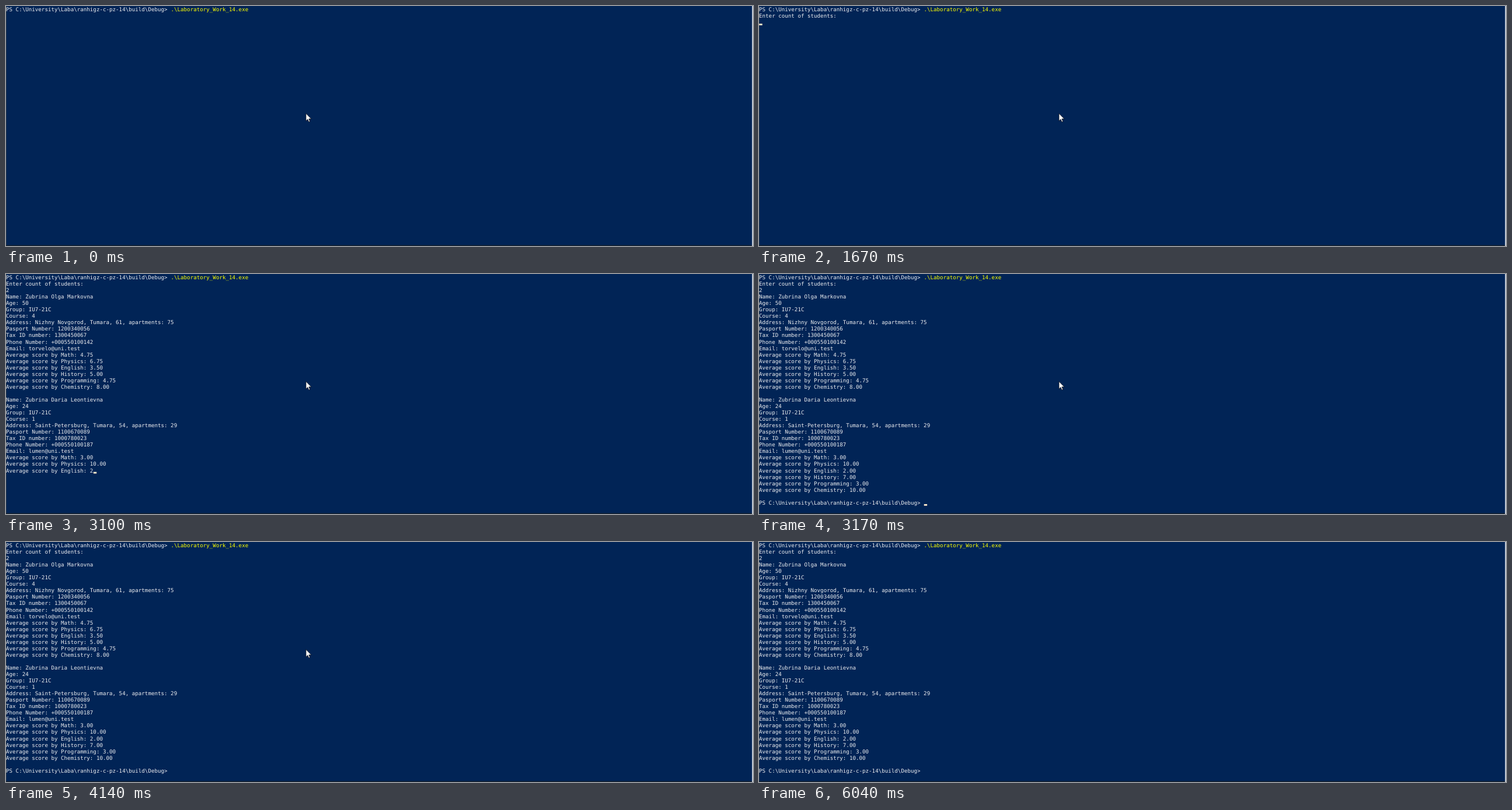
These frames come from a looping animation (1280x412 px, 6380 ms). An HTML page:

```html
<!DOCTYPE html>
<html lang="en">
<head>
<meta charset="utf-8">
<title>Terminal session</title>
<style>
  html, body { margin: 0; width: 100%; height: 100%; overflow: hidden; background: #012456; }
  svg { display: block; width: 1280px; height: 412px; }
  text {
    font: 9.2px "DejaVu Sans Mono", monospace;
    text-rendering: geometricPrecision;
    white-space: pre;
    fill: #eeedf0;
  }
  .cmd { fill: #ffff00; }
</style>
</head>
<body>
<svg viewBox="0 0 1280 412">
  <rect width="1280" height="412" fill="#012456"/>
  <rect width="1" height="411" fill="#24364c"/>
  <rect y="410.5" width="1280" height="1.5" fill="#17222f"/>
  <rect x="1278.5" width="1.5" height="412" fill="#e9ecef"/>
  <g id="rows"></g>
  <rect id="caret" width="5.4" height="2.8" fill="#feeacb"/>
  <path id="pointer" d="M0 0V16L3.7 12.6L6.2 18.3L8.6 17.2L6.2 11.7H11.5Z"
        fill="#fff" stroke="#0a0f18" stroke-width="1"/>
</svg>
<script>
const LOOP = 6380, CHAR = 5.538, LINE = 11.05, BASE = 9;
const PROMPT = String.raw`PS C:\University\Laba\ranhigz-c-pz-14\build\Debug> `;
const COMMAND = String.raw`.\Laboratory_Work_14.exe`;
const SUBJECTS = ["Math", "Physics", "English", "History", "Programming", "Chemistry"];

const student = (name, age, course, address, passport, tax, phone, email, scores) => [
  "Name: " + name,
  "Age: " + age,
  "Group: IU7-21C",
  "Course: " + course,
  "Address: " + address,
  "Pasport Number: " + passport,
  "Tax ID number: " + tax,
  "Phone Number: " + phone,
  "Email: " + email,
  ...SUBJECTS.map((s, i) => `Average score by ${s}: ${scores[i]}`),
  ""
];

const lines = [
  PROMPT,
  "Enter count of students:",
  "2",
  ...student("Zubrina Olga Markovna", 50, 4, "Nizhny Novgorod, Tumara, 61, apartments: 75",
    "1200340056", "1300450067", "+000550100142", "torvelo@uni.test",
    ["4.75", "6.75", "3.50", "5.00", "4.75", "8.00"]),
  ...student("Zubrina Daria Leontievna", 24, 1, "Saint-Petersburg, Tumara, 54, apartments: 29",
    "1100670089", "1000780023", "+000550100187", "lumen@uni.test",
    ["3.00", "10.00", "2.00", "7.00", "3.00", "10.00"]),
  PROMPT
];
const PARTIAL = 30, LAST = lines.length - 1;
const partialLine = lines[PARTIAL].slice(0, -3);

// [start ms, full rows shown]
const rowSteps = [[0, 1], [1670, 2], [2440, 3], [3100, PARTIAL], [3140, LAST], [3170, LAST + 1]];

// [start ms, row, column, opacity]
const caretSteps = [
  [0, 0, 75, 0], [40, 0, 75, 1], [440, 0, 75, 0], [970, 0, 75, 1], [1500, 0, 75, 0],
  [1670, 2, 0, 1], [2440, 2, 1, 1], [2570, 2, 1, .5], [2600, 2, 1, 0],
  [3100, PARTIAL, partialLine.length, 1], [3140, LAST, 0, 1], [3170, LAST, 51, 1],
  [4140, LAST, 51, 0], [4670, LAST, 51, 1], [5200, LAST, 51, 0],
  [5740, LAST, 51, 1], [6000, LAST, 51, 0]
];

// [start ms, x, y]
const pointerSteps = [[0, 514, 184.5], [5370, 470, 164], [5400, 325, 96], [5440, 118, 2], [5470, 0, -40]];

const at = (steps, t) => steps.findLast(s => s[0] <= t);
const $ = id => document.getElementById(id);

function addText(str, row, col, cls) {
  const el = document.createElementNS("http://www.w3.org/2000/svg", "text");
  el.setAttribute("x", col * CHAR);
  el.setAttribute("y", BASE + row * LINE);
  if (cls) el.setAttribute("class", cls);
  el.textContent = str;
  $("rows").append(el);
  return el;
}

const rows = lines.map((str, i) => addText(str, i, 0));
addText(COMMAND, 0, PROMPT.length, "cmd");

function draw(t) {
  const count = at(rowSteps, t)[1];
  const typing = count === PARTIAL;
  rows.forEach((el, i) => {
    el.style.display = i < count || (typing && i === PARTIAL) ? "" : "none";
  });
  const str = typing ? partialLine : lines[PARTIAL];
  if (rows[PARTIAL].textContent !== str) rows[PARTIAL].textContent = str;

  const [, row, col, alpha] = at(caretSteps, t);
  $("caret").setAttribute("x", col * CHAR + .3);
  $("caret").setAttribute("y", (row + 1) * LINE - 2.8);
  $("caret").setAttribute("opacity", alpha);

  const [, x, y] = at(pointerSteps, t);
  $("pointer").setAttribute("transform", `translate(${x} ${y}) scale(.8)`);
}

const start = performance.now();
function tick(now) {
  draw(Math.max(0, now - start) % LOOP);
  requestAnimationFrame(tick);
}
draw(0);
requestAnimationFrame(tick);
</script>
</body>
</html>
```
